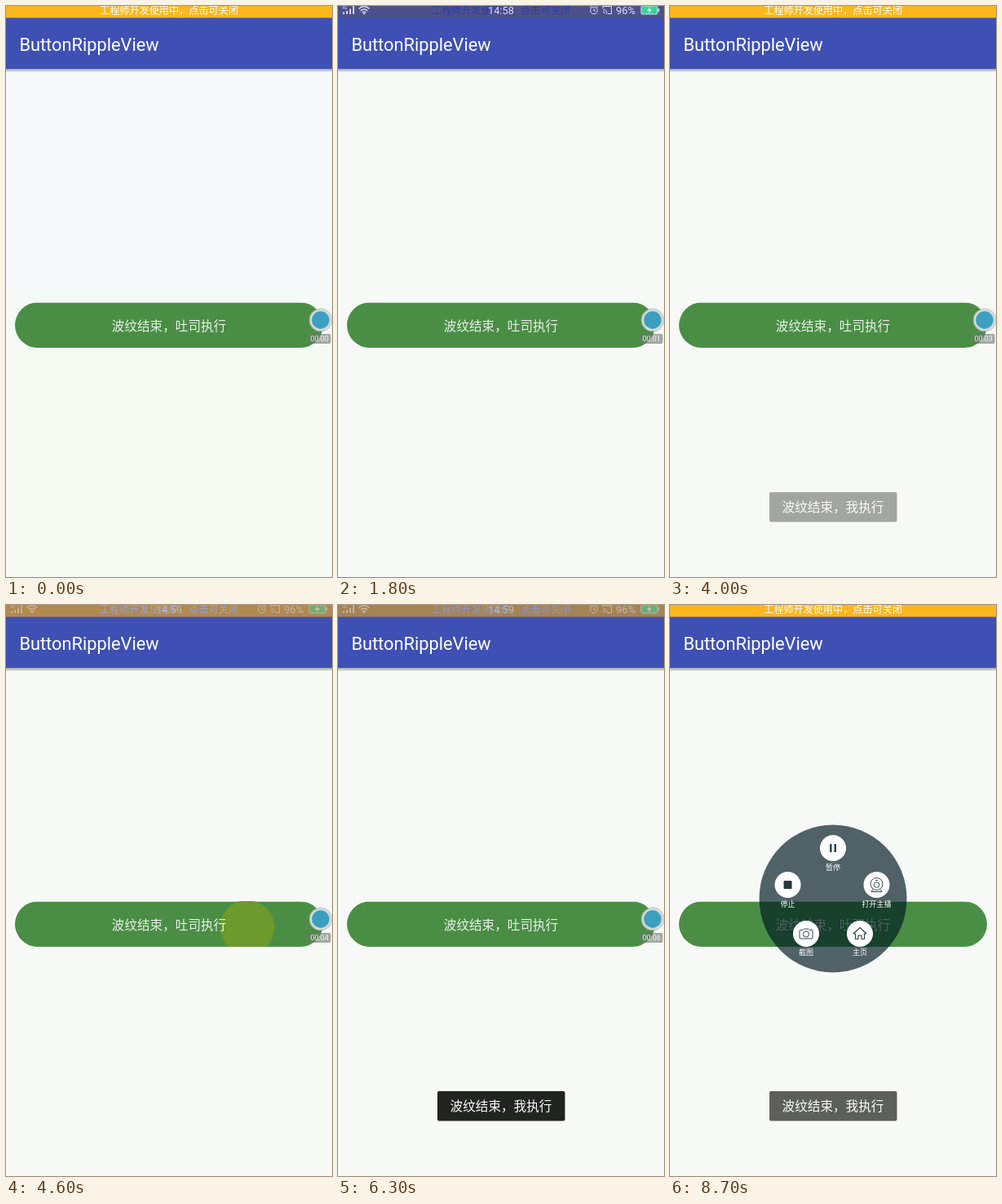
Animation, 400 px wide and 700 px high, one loop 8800 ms. Source, as an HTML page:

```html
<!DOCTYPE html>
<html lang="zh-CN">
<head>
<meta charset="utf-8">
<title>ButtonRippleView</title>
<style>
  html, body { margin: 0; width: 100%; height: 100%; overflow: hidden; background: #f7f9f7; }
  svg { display: block; width: 100vw; height: 100vh; }
  text { font-family: "Noto Sans CJK SC", "Noto Sans CJK", sans-serif; fill: #fff; }
  .mid { text-anchor: middle; }
  .latin { font-family: Roboto, sans-serif; }
  .line { fill: none; stroke: currentColor; }

  #tint, #bar, #notice, #icons, #toast, #ball, #menu { animation: 8.8s linear infinite; }

  #tint { animation-name: tint; }
  @keyframes tint { 0%, 1% { opacity: 1; } 10.2%, 100% { opacity: 0; } }

  /* status bar breathes between the orange notice and the system icons */
  #bar { animation-name: bar; }
  @keyframes bar {
    0%, 1.14%, 27.27%, 48.86%, 75%, 100% { fill: #fdb71e; }
    10.23%, 19.32%, 57.95%, 67.05% { fill: #303f9f; }
  }
  #notice { animation-name: notice; }
  @keyframes notice {
    0%, 1.14%, 27.27%, 48.86%, 75%, 100% { fill: #fff; }
    8.18%, 21.14%, 55.9%, 68.86% { fill: #303f9f; }
  }
  #icons { color: #dde0f0; animation-name: icons; }
  #icons text { fill: currentColor; }
  @keyframes icons {
    0%, 1.14%, 27.27%, 48.86%, 75%, 100% { opacity: 0; }
    8.18%, 21.14%, 55.9%, 68.86% { opacity: 1; }
  }

  .ripple { opacity: 0; animation: ripple 8.8s linear infinite; }
  @keyframes ripple {
    0% { transform: scale(0); opacity: 1; fill: #6d9a2c; }
    10.23% { transform: scale(297); fill: #639a33; }
    14.7% { transform: scale(297); opacity: 1; fill: #639a33; }
    14.71%, 100% { transform: scale(297); opacity: 0; fill: #639a33; }
  }

  #toast { animation-name: toast; }
  @keyframes toast {
    0%, 21%, 47.7%, 67%, 100% { opacity: 0; }
    26.1%, 42%, 71.6%, 98.8% { opacity: 1; }
    98.85%, 99.99% { opacity: .72; }
  }

  #ball { animation-name: ball; }
  @keyframes ball { 0%, 73.86% { opacity: 1; } 73.87%, 100% { opacity: 0; } }

  #menu { animation-name: menu; }
  @keyframes menu {
    0%, 73.86% { transform: translate(386px, 385px) scale(.12); opacity: 0; }
    73.87% { transform: translate(386px, 385px) scale(.12); opacity: 1; animation-timing-function: ease-out; }
    78.41% { transform: translate(192.5px, 359px) scale(1.034); opacity: 1; }
    79.55%, 100% { transform: translate(200px, 360px) scale(1); opacity: 1; }
  }
  #menu { color: #33474d; }
  #menu text { font-size: 9px; }
</style>
</head>
<body>
<svg viewBox="0 0 400 700">
  <defs>
    <linearGradient id="sky" x2="0" y2="1">
      <stop offset=".45" stop-color="#f5f9fb"/>
      <stop offset=".6" stop-color="#f5faf3"/>
    </linearGradient>
    <linearGradient id="shade" x2="0" y2="1">
      <stop stop-opacity=".36"/>
      <stop offset="1" stop-opacity="0"/>
    </linearGradient>
    <clipPath id="pill"><rect x="11" y="363.5" width="378" height="55.5" rx="27.75"/></clipPath>
  </defs>

  <rect width="400" height="700" fill="#f7f9f7"/>
  <rect id="tint" width="400" height="700" fill="url(#sky)"/>

  <rect y="77" width="400" height="4.5" fill="url(#shade)"/>
  <rect y="14" width="400" height="63" fill="#3e50b4"/>
  <text class="latin" x="16.4" y="55" font-size="21.8">ButtonRippleView</text>

  <rect id="bar" width="400" height="14.5"/>
  <text id="notice" class="mid" x="200" y="9.8" font-size="12.15">工程师开发使用中，点击可关闭</text>
  <g id="icons">
    <text class="latin" x="5" y="4" font-size="5">4G</text>
    <path class="line" stroke-width="1.8" d="M7 10V7.5M11 10V6M15 10V3.5M19 10V0"/>
    <path class="line" stroke-width="1.4" d="M25.5 3.5q6.500-6 13 0M27.700 6q4.300-4 8.600 0M29.800 8.300q2.200-2 4.400 0"/>
    <circle cx="32" cy="9.500" r="1" fill="currentColor"/>
    <text id="clock" class="latin mid" x="200" y="10.200" font-size="12.800">14:58</text>
    <g class="line">
      <circle cx="314" cy="5.500" r="4.300"/>
      <path d="M314 3v3h2M309 2l2.500-2M319 2l-2.500-2"/>
      <path d="M325 3V.5h10.500v9H331M325 4.500q5 0 5 5M325 7q2.500 0 2.500 2.500"/>
    </g>
    <text class="latin" x="341" y="10" font-size="13">96%</text>
    <rect x="372" y="0" width="20" height="10" rx="1.5" fill="#3ecf98" stroke="currentColor"/>
    <rect x="392.500" y="3" width="1.700" height="4" fill="currentColor"/>
    <path d="M383 1l-4 4.700h3l-1 3.300 4-4.700h-3z" fill="#fff"/>
  </g>

  <g clip-path="url(#pill)">
    <rect x="11" y="363" width="378" height="57" fill="#4a8e45"/>
    <g transform="translate(240 392)"><circle class="ripple" r="1" style="animation-delay:.5s"/></g>
    <g transform="translate(296 395)"><circle class="ripple" r="1" style="animation-delay:4.5s"/></g>
  </g>
  <text class="mid" x="200" y="398" font-size="15.6" fill-opacity=".88">波纹结束，吐司执行</text>

  <g id="ball">
    <circle cx="386" cy="385" r="14.5" fill="#a9b4b4" fill-opacity=".6"/>
    <circle cx="386" cy="385" r="12" fill="#3c9fc0" stroke="#d3d9da" stroke-width="2.6"/>
    <rect x="371" y="402" width="27.500" height="12" rx="2" fill="#6f776f" fill-opacity=".62"/>
    <text id="timer" class="latin mid" x="384.700" y="411.300" font-size="9" fill-opacity=".85">00:00</text>
  </g>

  <g id="toast">
    <rect x="122" y="596" width="156.500" height="36.500" rx="2" fill="#222422"/>
    <text class="mid" x="200" y="620" font-size="15.6">波纹结束，我执行</text>
  </g>

  <g id="menu">
    <circle r="90.500" fill="#011b23" fill-opacity=".68"/>
    <g transform="translate(0 -62)">
      <circle r="16" fill="#fff"/>
      <path class="line" stroke-width="2.600" d="M-2.700-5V5M2.700-5V5"/>
      <text class="mid" y="26.700">暂停</text>
    </g>
    <g transform="translate(-55.500 -17)">
      <circle r="16" fill="#fff"/>
      <rect x="-5" y="-5" width="10" height="10" rx="1" fill="#24383c"/>
      <text class="mid" y="26.700">停止</text>
    </g>
    <g transform="translate(53.500 -17)">
      <circle r="16" fill="#fff"/>
      <g class="line">
        <circle cy="-1" r="7.500"/>
        <circle r="3.300"/>
        <path d="M-1.500-5.500h3M-4.500 5.500l-2 3h13l-2-3"/>
      </g>
      <text class="mid" y="26.700">打开主播</text>
    </g>
    <g transform="translate(-33 43)">
      <circle r="16" fill="#fff"/>
      <g class="line">
        <path d="M-7-4.500h3l1.500-1.500h5l1.500 1.500h3q1 0 1 1v8.500q0 1-1 1h-14q-1 0-1-1v-8.500q0-1 1-1z"/>
        <circle cy=".5" r="3.600"/>
      </g>
      <text class="mid" y="26.200">截图</text>
    </g>
    <g transform="translate(33 43)">
      <circle r="16" fill="#fff"/>
      <path class="line" stroke-width="1.200" stroke-linejoin="round"
            d="M-8 0L0-7.500 8 0H5.500V6.500H2V2H-2V6.500H-5.500V0z"/>
      <text class="mid" y="26.200">主页</text>
    </g>
  </g>
</svg>
<script>
  const LOOP = 8800;
  const timer = document.getElementById('timer');
  const clock = document.getElementById('clock');
  const anim = document.getElementById('toast').getAnimations()[0];

  function tick() {
    const t = (anim.currentTime || 0) % LOOP;
    timer.textContent = '00:0' + Math.floor(t / 1000);
    clock.textContent = t < 3000 ? '14:58' : '14:59';
    requestAnimationFrame(tick);
  }
  tick();
</script>
</body>
</html>
```
